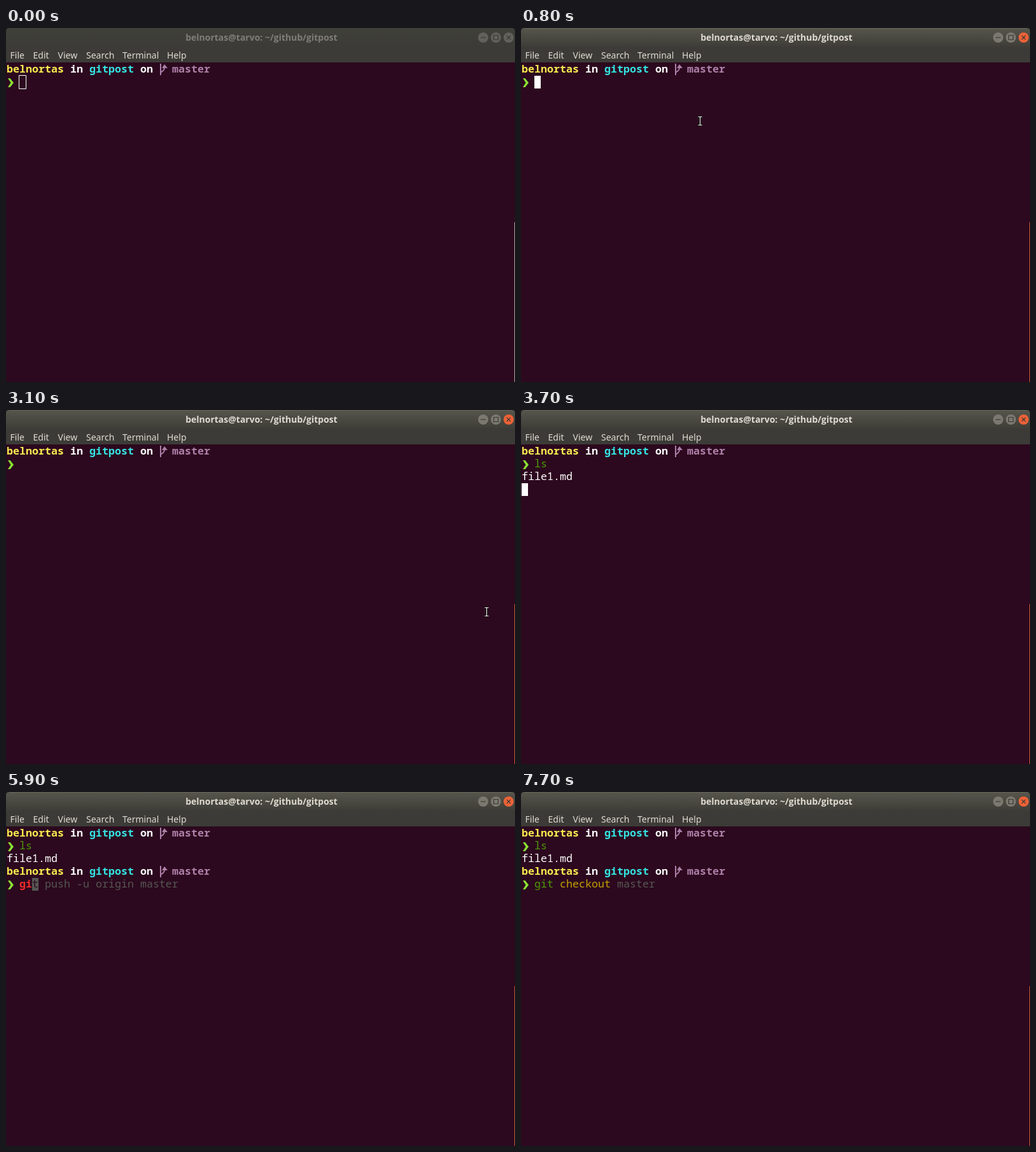
Recreate the animation shown at these times as an HTML page with a canvas. Size 800 by 556 pixels, loop 8000 ms.

```html
<!DOCTYPE html>
<html lang="en">
<head>
<meta charset="utf-8">
<title>Terminal session</title>
<style>
html, body { margin: 0; width: 800px; height: 556px; overflow: hidden; background: #2c091e; }
canvas { display: block; }
</style>
</head>
<body>
<canvas id="stage" width="800" height="556"></canvas>
<script>
const g = document.getElementById('stage').getContext('2d');
const LOOP = 8000, CELL = 10;
const MONO = '16.667px "Noto Sans Mono", monospace';
const USER = 'belnortas', HOST = 'tarvo';
const C = {
  bg: '#2c091e', white: '#ffffff', yellow: '#fce94f', cyan: '#34e2e2', purple: '#ad7fa8',
  lime: '#8ae234', green: '#4e9a06', red: '#ef2929', gold: '#c4a000', grey: '#555753'
};

// Command being typed: start time, typed length, full suggestion
const PUSH = 'git push -u origin master', COMMIT = 'git commit -m "Initial commit"', CHECKOUT = 'git checkout master';
const typing = [
  [5700, 1, 'g'], [5800, 1, PUSH], [5900, 2, PUSH], [6000, 3, PUSH], [6100, 4, PUSH],
  [6300, 5, COMMIT], [6400, 6, CHECKOUT], [6600, 8, CHECKOUT], [6700, 9, CHECKOUT],
  [6900, 10, CHECKOUT], [7100, 12, CHECKOUT]
];

// Mouse pointer: start time, x, y
const mouse = [
  [500, 247, 27], [600, 281, 146], [2400, 231, 205], [2500, 390, 248], [2600, 533, 276],
  [2800, 700, 305], [2900, 757, 315], [3100, 755, 317], [3500, -50, -50]
];

const latest = (list, t) => list.filter(e => e[0] <= t).pop();

function rect(x, y, w, h, color) {
  g.fillStyle = color;
  g.fillRect(x, y, w, h);
}

function label(str, x, y, color, font) {
  g.font = font;
  g.fillStyle = color;
  g.fillText(str, x, y);
}

function path(d, color, width) {
  const p = new Path2D(d);
  g.lineWidth = width || 1;
  g.fillStyle = g.strokeStyle = color;
  width ? g.stroke(p) : g.fill(p);
}

function mono(str, col, row, color, bold) {
  label(str, 1 + col * CELL, 70 + row * 20, color, (bold ? 'bold ' : '') + MONO);
}

// Two rows: the status line, then the chevron of the input line
function prompt(row) {
  mono(USER, 0, row, C.yellow, true);
  mono('in', 10, row, C.white, true);
  mono('gitpost', 13, row, C.cyan, true);
  mono('on', 21, row, C.white, true);
  mono('master', 26, row, C.purple, true);
  g.save();
  g.translate(0, row * 20);
  path('M243 56V74M243 70L247 67Q249 65.5 249 62', C.purple, 2);
  path('M245 63L249 57L254 63Z', C.purple);
  path('M3 79H6.5L12 86L6.5 93H3L7.5 86Z', C.lime);
  g.restore();
}

function cursor(col, row, color = C.white) {
  rect(1 + col * CELL, 55 + row * 20, CELL, 20, color);
}

function button(x, icon, fill, ink) {
  g.beginPath();
  g.arc(x, 15, 8, 0, 7);
  g.fillStyle = fill;
  g.fill();
  g.save();
  g.translate(x, 15);
  path(icon, ink, 1.2);
  g.restore();
}

function frame(focused) {
  rect(0, 0, 800, 556, C.bg);
  const shade = g.createLinearGradient(0, 0, 0, 30);
  shade.addColorStop(0, focused ? '#57564c' : '#40403a');
  shade.addColorStop(1, focused ? '#3d3c37' : '#3c3b37');
  rect(0, 0, 800, 30, shade);
  rect(0, 30, 800, 24, '#3c3b37');
  if (focused) rect(5, 0, 790, 1, '#66645a');
  path('M0 0H5Q0 0 0 5ZM800 0H795Q800 0 800 5Z', '#17161a');

  g.textAlign = 'center';
  label(`${USER}@${HOST}: ~/github/gitpost`, 401.5, 20, focused ? '#dfdbd2' : '#807d78',
    'bold 14px "Open Sans", sans-serif');
  g.textAlign = 'left';
  const menu = { File: 6.5, Edit: 42.5, View: 81.5, Search: 126, Terminal: 183, Help: 253 };
  for (const name in menu) label(name, menu[name], 48, '#dfdbd2', '14px "Noto Sans", sans-serif');

  const fill = focused ? '#7b796f' : '#62615b', ink = '#3a3934';
  button(750, 'M-4 0H4', fill, ink);
  button(770, 'M-3.5 -3.5H3.5V3.5H-3.5Z', fill, ink);
  button(790, 'M-3 -3L3 3M3 -3L-3 3', focused ? '#ee6237' : fill, ink);
  rect(799, 305, 1, 251, focused ? '#c95c35' : '#b3aaa4');
}

function command(t, row, blinkOn) {
  const [start, n, full] = latest(typing, t);
  const known = n > 2, wrong = !known && start >= 5800;
  const args = full.slice(4, n);
  mono(full.slice(0, Math.min(n, 3)), 2, row, known ? C.green : wrong ? C.red : C.white, wrong);
  mono(args, 6, row, args === 'checkout' ? C.gold : C.white);
  mono(full.slice(n), n + 2, row, C.grey);
  if (!blinkOn) return;
  cursor(n + 2, row, n < full.length ? C.grey : C.white);
  mono(full.charAt(n), n + 2, row, C.bg);
}

function pointer(t) {
  const [start, x, y] = latest(mouse, t) || [0, -50, -50];
  g.save();
  g.translate(x, y);
  if (start === 500) {
    const arrow = 'M.5 .5V14L4 11L6 16L8.5 15L6.5 10H10.5Z';
    path(arrow, '#111');
    path(arrow, '#eee', 1);
  } else {
    const beam = 'M-2.5 -6.5H3.5M.5 -6.5V6.5M-2.5 6.5H3.5';
    path(beam, '#111', 3);
    path(beam, '#fff', 1);
  }
  g.restore();
}

function draw(t) {
  const focused = t >= 800;
  frame(focused);
  prompt(0);
  const lastKey = t < 3500 ? 800 : t < 3600 ? 3500 : t < 5700 ? 3600 : latest(typing, t)[0];
  const blinkOn = Math.floor((t - lastKey) / 600) % 2 === 0;

  if (t >= 3500) mono(t < 3600 ? 'l' : 'ls', 2, 1, C.green);
  if (t >= 3700) mono('file1.md', 0, 2, C.white);
  if (t >= 3800) prompt(3);

  if (!focused) path('M20.5 74.5H31.5V95.5H20.5Z', C.white, 1);
  else if (t >= 5700) command(t, 4, blinkOn);
  else if (blinkOn) {
    if (t < 3500) cursor(2, 1);
    else if (t < 3700) cursor(t < 3600 ? 3 : 4, 1);
    else if (t < 3800) cursor(0, 3);
    else cursor(2, 4);
  }
  pointer(t);
}

const begin = performance.now();
function tick() {
  draw((performance.now() - begin) % LOOP);
  requestAnimationFrame(tick);
}
tick();
</script>
</body>
</html>
```
